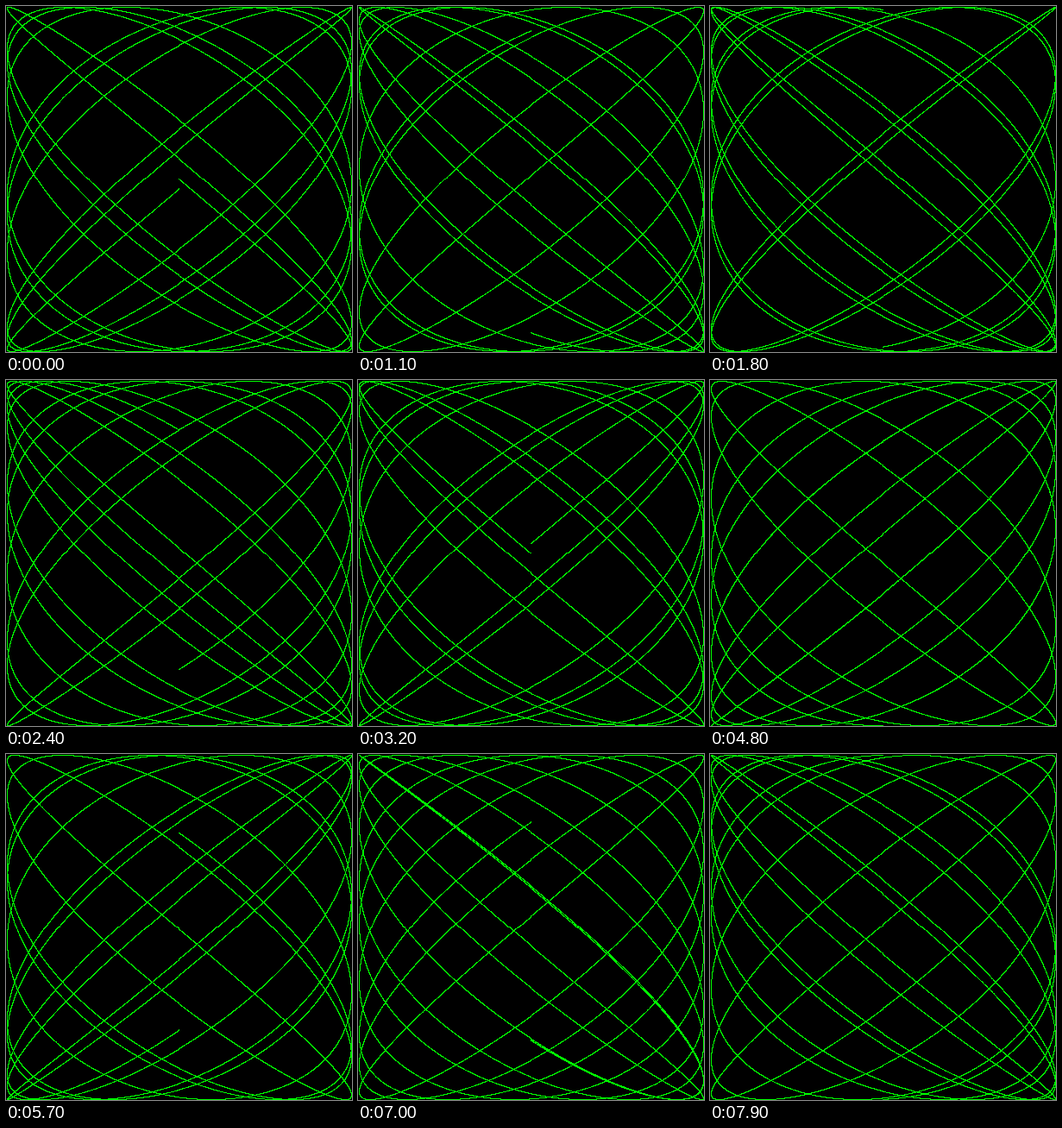
Recreate the animation shown at these times as an HTML page with a canvas. Size 401 by 401 pixels, loop 8 s.

```html
<!DOCTYPE html>
<html lang="en">
<head>
<meta charset="utf-8">
<title>Lissajous curve</title>
<style>
  html, body { margin: 0; width: 100%; height: 100%; overflow: hidden; background: #000; }
  canvas { display: block; width: 401px; height: 401px; image-rendering: pixelated; }
</style>
</head>
<body>
<canvas id="stage" width="401" height="401"></canvas>
<script>
const R = 200, SIZE = 2 * R + 1;
const CYCLES = 10, RES = 0.001;
const FREQ = 0.849117;          // y frequency relative to x
const STEP_MS = 100, STEPS = 80, PHASE_STEP = 0.1;
const BLACK = 0xff000000, GREEN = 0xff00ff00;

const ctx = document.getElementById('stage').getContext('2d');
const image = ctx.createImageData(SIZE, SIZE);
const pixels = new Uint32Array(image.data.buffer);

const toPixel = v => R + Math.trunc(v * R + 0.5);

function draw(phase) {
  pixels.fill(BLACK);
  const end = CYCLES * 2 * Math.PI;
  for (let t = 0; t < end; t += RES) {
    const x = toPixel(Math.sin(t));
    const y = toPixel(Math.sin(t * FREQ + phase));
    pixels[y * SIZE + x] = GREEN;
  }
  ctx.putImageData(image, 0, 0);
}

const start = performance.now();
let shown = -1;

function tick() {
  const step = Math.floor((performance.now() - start) / STEP_MS) % STEPS;
  if (step !== shown) {
    shown = step;
    draw(step * PHASE_STEP);
  }
  requestAnimationFrame(tick);
}
tick();
</script>
</body>
</html>
```
